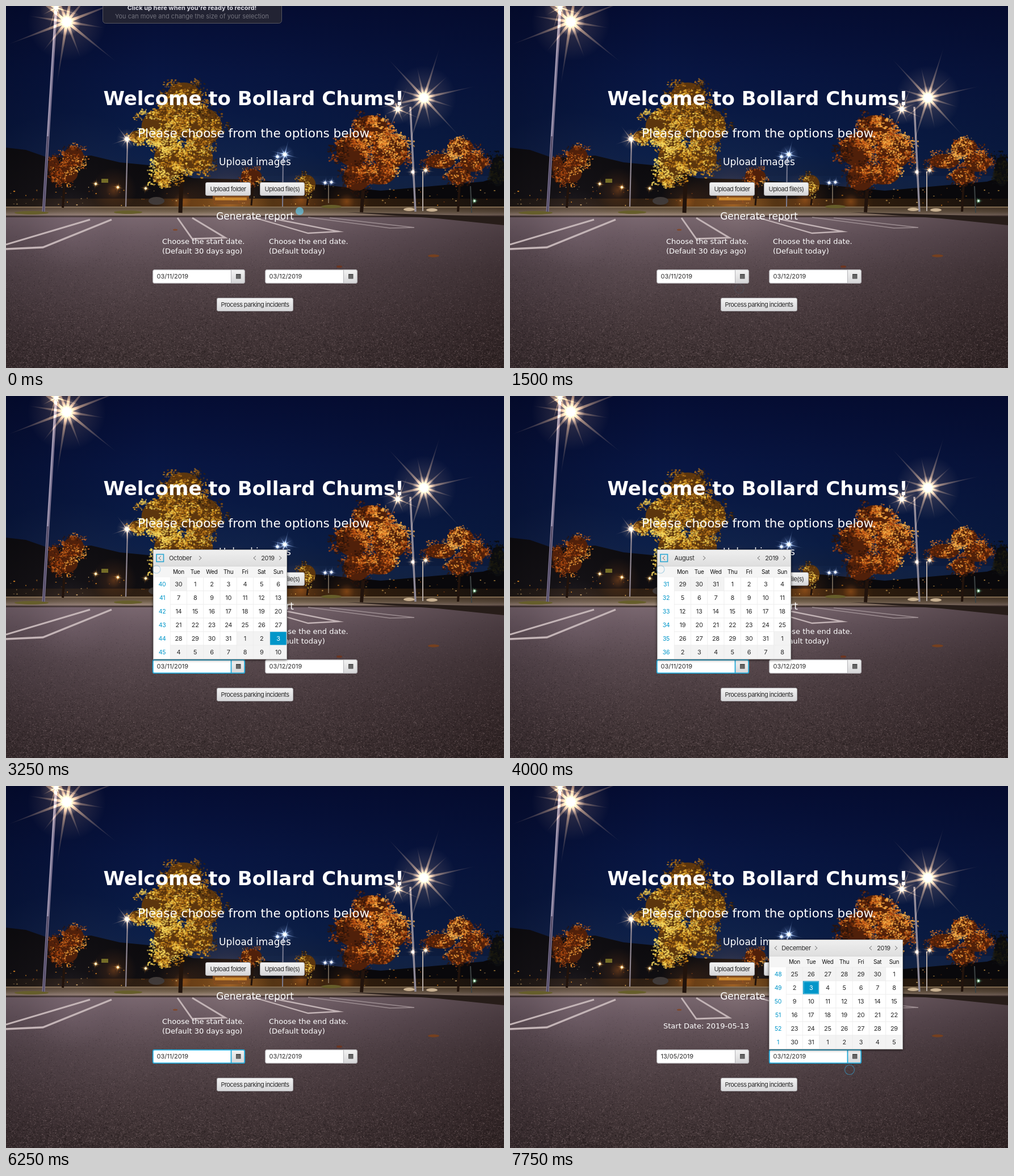
These frames come from a looping animation (877 by 639 pixels, 8000 ms). An HTML page with a canvas:

```html
<!DOCTYPE html>
<html lang="en">
<head>
<meta charset="utf-8">
<title>Parking lot report</title>
<style>
  html, body { margin: 0; width: 100%; height: 100%; overflow: hidden; background: #08143c; }
  canvas, svg { position: absolute; left: 0; top: 0; width: 877px; height: 639px; }
  text { white-space: pre; }
  .head { font-family: "DejaVu Sans", sans-serif; fill: #fff; }
  .ui { font-family: Inter, "Open Sans", sans-serif; font-size: 11px; fill: #2a2a2a; }
  .tight { letter-spacing: -.58px; }
  .snug { letter-spacing: -.3px; }
  .mid { text-anchor: middle; }
</style>
</head>
<body>
<canvas id="scene" width="877" height="639"></canvas>
<svg viewBox="0 0 877 639">
  <defs>
    <linearGradient id="btn" x1="0" y1="0" x2="0" y2="1">
      <stop offset="0" stop-color="#f3f3f3"/><stop offset="1" stop-color="#d6d6d8"/>
    </linearGradient>
    <linearGradient id="bar" x1="0" y1="0" x2="0" y2="1">
      <stop offset="0" stop-color="#f0f0f0"/><stop offset="1" stop-color="#dedede"/>
    </linearGradient>
    <filter id="shadow" x="-10%" y="-10%" width="120%" height="120%">
      <feDropShadow dx="0" dy="1" stdDeviation="2.5" flood-opacity=".6"/>
    </filter>
  </defs>
  <g id="ui"></g>
</svg>
<script>
const LOOP = 8000, STEP = 250, CYAN = '#0096c9';

// ---------- night scene ----------
const ctx = document.getElementById('scene').getContext('2d');
let seed = 4711;
const rnd = () => (seed = seed * 16807 % 2147483647) / 2147483647;
const between = (a, b) => a + (b - a) * rnd();
const pick = list => list[Math.floor(rnd() * list.length)];

function fade(x0, y0, x1, y1, stops) {
  const g = ctx.createLinearGradient(x0, y0, x1, y1);
  stops.forEach(([at, color]) => g.addColorStop(at, color));
  return g;
}
function box(x, y, w, h, fill) {
  ctx.fillStyle = fill;
  ctx.fillRect(x, y, w, h);
}
function shape(points, fill) {
  ctx.fillStyle = fill;
  ctx.beginPath();
  points.forEach(p => ctx.lineTo(...p));
  ctx.fill();
}
function line(points, color, width) {
  ctx.strokeStyle = color;
  ctx.lineWidth = width;
  ctx.beginPath();
  points.forEach(p => ctx.lineTo(...p));
  ctx.stroke();
}
function oval(x, y, rx, ry, fill) {
  ctx.fillStyle = fill;
  ctx.beginPath();
  ctx.ellipse(x, y, rx, ry, 0, 0, 7);
  ctx.fill();
}
function glow(x, y, r, rgb, alpha) {
  const g = ctx.createRadialGradient(x, y, 0, x, y, r);
  g.addColorStop(0, `rgba(${rgb},${alpha})`);
  g.addColorStop(.35, `rgba(${rgb},${alpha * .3})`);
  g.addColorStop(1, `rgba(${rgb},0)`);
  oval(x, y, r, r, g);
}
function star(x, y, r, rays, turn, rgb = '255,196,120') {
  ctx.save();
  ctx.globalCompositeOperation = 'lighter';
  glow(x, y, r * .6, rgb, .45);
  for (let i = 0; i < rays; i++) {
    const a = turn + i * 2 * Math.PI / rays, len = r * (i % 2 ? .6 : 1), w = r * .022 + .4;
    const ex = x + Math.cos(a) * len, ey = y + Math.sin(a) * len;
    shape([
      [x - Math.sin(a) * w, y + Math.cos(a) * w], [ex, ey], [x + Math.sin(a) * w, y - Math.cos(a) * w]
    ], fade(x, y, ex, ey, [[0, `rgba(${rgb},.7)`], [.4, `rgba(${rgb},.3)`], [1, `rgba(${rgb},0)`]]));
  }
  glow(x, y, r * .2 + 2, '255,246,215', .95);
  oval(x, y, r * .05 + .8, r * .05 + .8, '#fffbe6');
  ctx.restore();
}
// Leaves grow in clumps; tones run from bright near the light to dark away from it.
function foliage(lobes, tones, [lx, ly, reach], size) {
  const toneAt = (x, y, jitter) => {
    const depth = Math.hypot(x - lx, y - ly) / reach + jitter;
    return tones[Math.floor(Math.min(.999, Math.max(0, depth)) * tones.length)];
  };
  lobes.forEach(([x, y, rx, ry]) => oval(x, y, rx * .76, ry * .76, tones[tones.length - 2]));
  lobes.forEach(([x, y, rx, ry]) => {
    for (let i = rx * ry / (size * 12); i > 0; i--) {
      const a = rnd() * 6.283, d = Math.sqrt(rnd()), shade = between(-.42, .42);
      const cx = x + Math.cos(a) * rx * d, cy = y + Math.sin(a) * ry * d;
      for (let n = 0; n < 14; n++) {
        const px = cx + between(-2.6, 2.6) * size, py = cy + between(-2, 2) * size;
        ctx.globalAlpha = between(.45, .9);
        oval(px, py, between(.3, .75) * size, between(.25, .6) * size, toneAt(px, py, shade + between(-.22, .22)));
      }
    }
  });
  ctx.globalAlpha = 1;
}

function drawScene() {
  box(0, 0, 877, 370, fade(0, 0, 0, 350, [[0, '#050d34'], [.35, '#081643'], [.75, '#0b1f49'], [1, '#15233f']]));
  box(0, 0, 877, 300, fade(0, 0, 877, 0, [[0, 'rgba(3,6,28,.4)'], [.3, 'rgba(3,6,28,0)'], [1, 'rgba(3,6,28,.25)']]));

  // wooded skyline
  shape([[0, 365], [0, 250], [35, 254], [75, 268], [150, 264], [200, 276], [262, 282], [330, 304], [420, 306],
    [560, 316], [660, 326], [750, 318], [840, 310], [877, 298], [877, 365]], '#09080b');
  foliage([[866, 292, 17, 35]], ['#1d1b10', '#12130f', '#0c0d10', '#0a0a0c'], [850, 300, 60], 3);
  box(0, 340, 877, 16, fade(0, 0, 877, 0, [[0, '#130e0b'], [.3, '#2a1a0c'], [.45, '#70420f'], [.6, '#38210d'], [1, '#15100d']]));
  ctx.globalCompositeOperation = 'lighter';
  [[390, 335, 75], [310, 345, 45], [520, 342, 50], [190, 325, 40], [600, 345, 40]].forEach(([x, y, r]) => glow(x, y, r, '190,95,20', .4));
  ctx.globalCompositeOperation = 'source-over';
  box(364, 335, 64, 15, '#7b4312');
  box(368, 338, 56, 5, '#c8801f');
  for (let i = 0; i < 110; i++) {
    ctx.globalAlpha = between(.3, .9);
    oval(between(5, 870), between(318, 353), between(.6, 1.8), between(.5, 1.2), pick(['#e88d20', '#ffc35a', '#9b4a12', '#cfa869']));
  }
  ctx.globalAlpha = 1;
  oval(265, 344, 14, 7, '#3b3634');
  box(168, 305, 12, 7, '#716a20');

  // verge and asphalt
  box(0, 354, 877, 21, fade(0, 354, 0, 375, [[0, '#8d7659'], [.15, '#5d4b37'], [.45, '#75634e'], [.7, '#9a8576'], [.82, '#3a2c29'], [1, '#5b4c50']]));
  box(0, 373, 877, 266, fade(0, 373, 0, 639, [[0, '#76646c'], [.13, '#67565e'], [.35, '#55464b'], [.65, '#483a3d'], [1, '#3b2f30']]));
  glow(110, 395, 210, '185,160,175', .2);
  glow(400, 375, 190, '185,165,160', .16);
  box(0, 356, 877, 283, fade(0, 0, 877, 0, [[0, 'rgba(20,12,20,.2)'], [.25, 'rgba(20,12,20,0)'], [.6, 'rgba(30,18,22,.04)'], [1, 'rgba(22,12,12,.38)']]));
  shape([[600, 364], [877, 372], [877, 387], [760, 375]], '#271d19');
  for (let i = 0; i < 22000; i++) {
    const y = 376 + 263 * Math.sqrt(rnd()), s = .6 + (y - 376) / 220;
    box(between(0, 877), y, s, s * .8, pick(['rgba(15,8,10,.25)', 'rgba(215,190,190,.15)']));
  }
  [[45, 365, 30], [215, 364, 25], [573, 354, 18]].forEach(([x, y, r]) => oval(x, y, r, 3, '#665e2b'));

  // bay markings
  const paint = '#c3b4b6';
  line([[148, 377], [0, 421]], paint, 3);
  line([[186, 377], [65, 426], [0, 429]], paint, 3.5);
  line([[302, 374], [328, 411], [386, 409], [328, 374]], paint, 3);
  line([[435, 373], [532, 401], [586, 398], [474, 376]], paint, 2.3);
  line([[532, 373], [676, 392], [719, 391], [570, 374]], '#9c8d91', 1.6);

  // trunks, then crowns
  [[307, 285, 365, 7], [626, 325, 364, 6], [796, 310, 363, 4], [100, 312, 356, 4], [432, 318, 352, 3], [530, 330, 352, 3]]
    .forEach(([x, top, foot, w]) => line([[x + 3, top], [x, foot]], '#21130c', w));
  const amber = ['#f6d65c', '#e9b536', '#d6951f', '#b8741a', '#8a5313', '#5c360e', '#33200d'];
  const rust = ['#f6ab45', '#ea8527', '#d1641b', '#ad4811', '#7d320c', '#50200a', '#2b140b'];
  foliage([[313, 164, 42, 38], [275, 213, 48, 42], [344, 213, 47, 45], [288, 270, 36, 45], [334, 268, 40, 32], [232, 231, 20, 15], [275, 303, 22, 15]], amber, [258, 262, 215], 3);
  foliage([[643, 219, 40, 35], [610, 254, 37, 38], [676, 257, 41, 40], [618, 302, 31, 32], [657, 297, 38, 24]], rust, [695, 235, 150], 3);
  foliage([[800, 249, 30, 20], [765, 274, 34, 17], [823, 276, 31, 22], [798, 300, 27, 19]], rust, [790, 258, 105], 2.5);
  foliage([[119, 267, 24, 24], [105, 296, 28, 22], [84, 284, 13, 25]], rust, [134, 284, 75], 2.3);
  foliage([[432, 300, 24, 16]], rust, [440, 310, 55], 2);
  foliage([[530, 315, 20, 22]], amber, [535, 325, 55], 2);

  // lamp posts and lights
  line([[88, 8], [75, 215], [66, 363]], '#79718f', 5);
  line([[87, 8], [73, 230]], '#aaa2ba', 1.6);
  line([[74, 230], [66, 363]], '#4f4761', 2);
  line([[214, 238], [211, 354]], '#8f8691', 2.2);
  line([[488, 268], [487, 354]], '#7a7c91', 2);
  line([[712, 178], [721, 363]], '#8f8997', 3.5);
  line([[734, 292], [734, 362]], '#b6aba6', 2);
  line([[568, 315], [568, 348]], '#9b8c78', 1.3);
  line([[818, 318], [820, 365]], '#3d4344', 2);
  star(107, 28, 115, 12, .68);
  star(88, 3, 48, 8, .3);
  star(736, 162, 95, 12, -.22);
  star(690, 182, 46, 8, .4);
  star(213, 235, 31, 10, .3);
  star(491, 262, 28, 8, .25, '205,225,255');
  star(478, 266, 14, 8, .1, '205,225,255');
  star(716, 293, 15, 8, 0);
  star(739, 290, 18, 8, .2);
  [[562, 312], [573, 311], [158, 314], [197, 320], [246, 322]].forEach(([x, y], i) =>
    star(x, y, 12, 8, .2, i < 2 ? '220,225,255' : '255,165,50'));
  star(825, 344, 10, 6, 0, '90,255,190');
  [[710, 359], [750, 360]].forEach(([x, y]) => oval(x, y, 10, 3, '#c9b191'));
  oval(753, 441, 10, 2.5, '#75401f');
  oval(587, 460, 5, 2, '#6c3520');
  oval(298, 395, 4, 1.5, '#80482b');
}

// ---------- interface ----------
const text = (x, y, str, cls, extra = '') => `<text x="${x}" y="${y}" class="${cls}" ${extra}>${str}</text>`;
const rect = (x, y, w, h, fill, extra = '') => `<rect x="${x}" y="${y}" width="${w}" height="${h}" fill="${fill}" ${extra}/>`;
const head = (x, y, size, str, extra = '') => text(x, y, str, 'head', `font-size="${size}" ${extra}`);
const button = (x, y, w, str) =>
  rect(x + .5, y + .5, w - 1, 23, 'url(#btn)', 'rx="2.5" stroke="#a9a9ad"') +
  text(x + w / 2, y + 15.5, str, 'ui tight mid');

function dateField(x, value, focused) {
  const edge = focused ? '#22a9d8' : '#b4b4b8', w = focused ? 1.8 : 1;
  let s = rect(x + .5, 465.5, 162, 24, '#fff', 'rx="2.5"') +
    `<path d="M${x + 138.5} 465.5h22a2 2 0 0 1 2 2v20a2 2 0 0 1-2 2h-22z" fill="url(#btn)"/>` +
    `<path d="M${x + 138.5} 466v23" stroke="${edge}" stroke-width="${w}"/>` +
    rect(x + .8, 465.8, 161.4, 23.4, 'none', `rx="2.5" stroke="${edge}" stroke-width="${w}"`) +
    text(x + 7.5, 481, value, 'ui') + rect(x + 147, 473, 8.5, 8.5, '#4a4a4a');
  for (let i = 0; i < 3; i++)
    s += `<path d="M${x + 148} ${475.8 + i * 2}h6.5" stroke="#ccc" stroke-width=".7" stroke-dasharray="1.3 .7"/>`;
  return s;
}

const DAY = 864e5;
const monthName = m => new Date(Date.UTC(2019, m, 1)).toLocaleString('en', { month: 'long', timeZone: 'UTC' });
function isoWeek(ms) {
  const thursday = ms + 3 * DAY, year = new Date(thursday).getUTCFullYear();
  return Math.floor((thursday - Date.UTC(year, 0, 1)) / DAY / 7) + 1;
}
const chevron = (x, dir) => `<path d="M${x + 2 * dir} 282.5l${-4 * dir} 3.5l${4 * dir} 3.5" fill="none" stroke="#666"/>`;

function calendar(x, month, selected, prevFocused) {
  const col = i => x + 30.3 + i * 29.25;
  const first = Date.UTC(2019, month, 1);
  const lead = (new Date(first).getUTCDay() + 6) % 7 || 7;
  let s = rect(x, 271, 236, 194, '#fff', 'filter="url(#shadow)"') +
    rect(x, 271, 236, 29, 'url(#bar)') + rect(x, 300, 236, 20, '#f5f5f5') +
    rect(x, 300, 236, .7, '#ccc') +
    [[12, 1], [83, -1], [179, 1], [224, -1]].map(([dx, dir]) => chevron(x + dx, dir)).join('') +
    text(x + 48, 290, monthName(month), 'ui snug mid') + text(x + 202, 290, '2019', 'ui snug mid');
  if (prevFocused) s += rect(x + 6, 279.5, 12.5, 13, 'none', 'stroke="#2aa5d0" stroke-width="1.6"');
  ['Mon', 'Tue', 'Wed', 'Thu', 'Fri', 'Sat', 'Sun'].forEach((d, i) =>
    s += text(col(i) + 14.6, 314, d, 'ui snug mid', 'style="font-size:10px;fill:#111"'));
  for (let r = 0; r < 6; r++) {
    const monday = first + (r * 7 - lead) * DAY, y = 320 + r * 24;
    s += text(x + 16, y + 16, isoWeek(monday), 'ui snug mid', `style="fill:${CYAN};font-size:10.5px"`);
    for (let c = 0; c < 7; c++) {
      const ms = monday + c * DAY, day = new Date(ms), on = ms === selected;
      const fill = on ? CYAN : day.getUTCMonth() === month ? '#fff' : '#f3f3f3';
      s += rect(col(c), y, 29.25, 24, fill, 'stroke="#ececec" stroke-width=".7"');
      if (on && !prevFocused) s += rect(col(c) + 1.7, y + 1.7, 26, 20.6, 'none', 'stroke="#6fc5e2" stroke-width=".8"');
      s += text(col(c) + 14.6, y + 16, day.getUTCDate(), 'ui snug mid', on ? 'style="fill:#fff"' : '');
    }
  }
  return s + rect(x + .5, 271.5, 235, 193, 'none', 'stroke="#b5b5b5"');
}

const disc = (x, y, alpha = .9) => `<circle cx="${x}" cy="${y}" r="7" fill="#62cff5" opacity="${alpha}"/>`;
const ring = (x, y, r, alpha) => `<circle cx="${x}" cy="${y}" r="${r}" fill="none" stroke="#3a9cc8" stroke-width="1.2" opacity="${alpha}"/>`;

function tooltip() {
  return rect(170.5, -10, 315, 40.5, '#252533', 'rx="5" stroke="#55555f" fill-opacity=".93"') +
    text(327.5, 7, "Click up here when you're ready to record!", 'ui mid', 'style="fill:#dcdce4;font-weight:700"') +
    text(327.5, 21.5, 'You can move and change the size of your selection', 'ui mid', 'style="fill:#72727d"');
}

function pointer(t) {
  const prev = [265, 287], below = [265, 306];
  const marks = [
    [0, disc(517, 362, .65)], [250, disc(517, 362, .3)], [500, ''],
    [1000, disc(404, 482)], [1250, ring(404, 501, 8.5, .7)], [1500, ring(404, 499, 8, .12)], [1750, ''],
    [2750, disc(...prev)], [3000, ring(...below, 7, .7)], [3250, ring(...below, 7, .35)],
    [3500, disc(...prev)], [3750, ring(...below, 7, .4)], [4250, disc(...prev)], [4500, ring(...below, 7, .4)],
    [4750, disc(...prev)], [5000, ring(...below, 7, .35)],
    [5250, disc(309, 371)], [5500, ring(309, 390, 8, .5)], [5750, ''],
    [7250, disc(598, 482)], [7500, ring(598, 501, 8, .8)], [7750, ring(598, 501, 8.5, .65)]
  ];
  return marks.filter(([at]) => at <= t).pop()[1];
}

function interfaceAt(t) {
  const chosen = t >= 6500, endOpen = t >= 7750;
  const turns = [3000, 3750, 4000, 4500, 4750, 5000].filter(at => t >= at).length;
  const endX = chosen ? 468 : 463;
  let s = head(171.5, 175, 34, 'Welcome to Bollard Chums!', 'font-weight="700"') +
    head(438.5, 232, 21.5, 'Please choose from the options below.', 'text-anchor="middle"') +
    head(438.5, 281, 17, 'Upload images', 'text-anchor="middle"') +
    button(351, 311, 80, 'Upload folder') + button(447, 311, 79, 'Upload file(s)') +
    head(438.5, 377, 17, 'Generate report', 'text-anchor="middle"');
  s += chosen
    ? head(270, 428, 13, 'Start Date: 2019-05-13')
    : head(275, 420, 13, 'Choose the start date.') + head(275, 436.5, 13, '(Default 30 days ago)');
  s += head(endX, 420, 13, 'Choose the end date.') + head(endX, 436.5, 13, '(Default today)') +
    dateField(258, chosen ? '13/05/2019' : '03/11/2019', t >= 1750 && !endOpen) +
    dateField(456, '03/12/2019', endOpen) + button(371, 515, 135, 'Process parking incidents');
  if (t >= 1750 && t < 6250) s += calendar(259, 10 - turns, Date.UTC(2019, 10, 3), turns > 0);
  if (endOpen) s += calendar(456, 11, Date.UTC(2019, 11, 3), false);
  if (t < 500) s += `<g opacity="${t < 250 ? 1 : .4}">${tooltip()}</g>`;
  return s + pointer(t);
}

drawScene();
const ui = document.getElementById('ui'), start = performance.now();
let shown = -1;
function tick(now) {
  const t = Math.floor(Math.max(0, now - start) % LOOP / STEP) * STEP;
  if (t !== shown) ui.innerHTML = interfaceAt(shown = t);
  requestAnimationFrame(tick);
}
tick(start);
</script>
</body>
</html>
```
